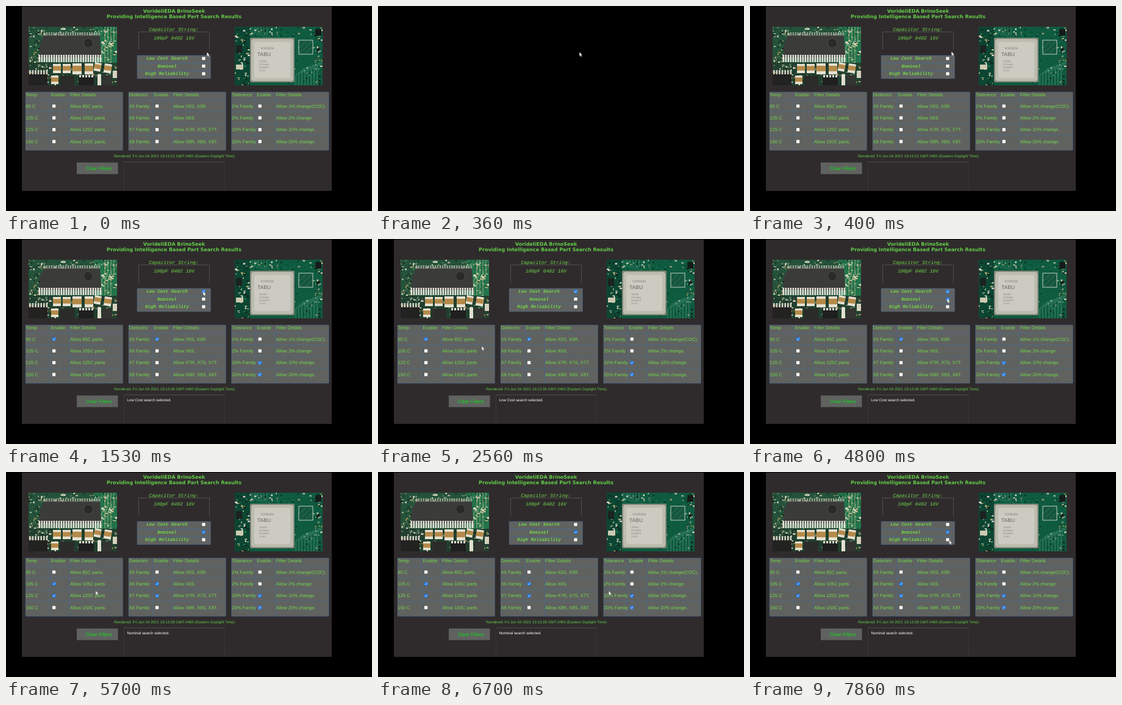
Recreate the animation shown at these times as an HTML page. Size 600x336 px, loop 8 s.

```html
<!DOCTYPE html>
<html lang="en">
<head>
<meta charset="utf-8">
<title>Part search</title>
<style>
  html, body { margin: 0; width: 100%; height: 100%; overflow: hidden; background: #000; }
  svg { display: block; }
  #stage { width: 600px; height: 336px; }
  text { font: 7.6px "Liberation Sans", Arial, sans-serif; fill: #72d94c; white-space: pre; text-rendering: geometricPrecision; }
  .title { font: bold 8px "DejaVu Sans", Verdana, sans-serif; fill: #62cc48; text-anchor: middle; }
  .mono { font: italic bold 7.5px "Liberation Mono", "Courier New", monospace; text-anchor: middle; }
  .label { font-size: 8px; font-weight: normal; }
  .button { font-size: 8px; fill: #10dc18; }
  .stamp { font-size: 6.22px; fill: #62cc48; }
  .message { font-size: 6.2px; fill: #fff; }
  .maker { font-size: 5px; fill: #77786f; }
  .model { font-size: 8.6px; fill: #66675f; }
  .small { font-size: 3.6px; fill: #77786f; }

  .idle, .lowPick, .lowSet, .nomPick, .nomSet, .anySet, #blank { animation: 8s step-end infinite; }
  .idle { animation-name: idle; }
  .lowPick { animation-name: lowPick; }
  .lowSet { animation-name: lowSet; }
  .nomPick { animation-name: nomPick; }
  .nomSet { animation-name: nomSet; }
  .anySet { animation-name: anySet; }
  #blank { animation-name: blank; }
  @keyframes idle { 0% { opacity: 1 } 19.125%, 100% { opacity: 0 } }
  @keyframes lowPick { 0% { opacity: 0 } 18.25% { opacity: 1 } 61.625%, 100% { opacity: 0 } }
  @keyframes lowSet { 0% { opacity: 0 } 19.125% { opacity: 1 } 61.625%, 100% { opacity: 0 } }
  @keyframes nomPick { 0% { opacity: 0 } 60%, 100% { opacity: 1 } }
  @keyframes nomSet { 0% { opacity: 0 } 61.625%, 100% { opacity: 1 } }
  @keyframes anySet { 0% { opacity: 0 } 19.125%, 100% { opacity: 1 } }
  @keyframes blank { 0% { opacity: 0 } 4.5% { opacity: 1 } 5%, 100% { opacity: 0 } }

  #pointer { animation: travel 8s linear infinite; }
  @keyframes travel {
    0%, .75% { transform: translate(329px, 75.5px) }
    4.5% { transform: translate(330px, 75.5px) }
    5% { transform: translate(330px, 74.5px) }
    7.5% { transform: translate(327px, 79px) }
    10.75%, 11.25% { transform: translate(322px, 84px) }
    12%, 14.1% { transform: translate(322.4px, 85px) }
    16.25%, 26.25% { transform: translate(323px, 86px) }
    28.75% { transform: translate(270px, 126px) }
    30.6% { transform: translate(210px, 165px) }
    32% { transform: translate(170px, 175.5px) }
    33.5% { transform: translate(135px, 173px) }
    34.5%, 37% { transform: translate(123.5px, 169px) }
    38.75% { transform: translate(165px, 150px) }
    40.6% { transform: translate(275px, 120px) }
    42.5% { transform: translate(337.5px, 104.5px) }
    43.5% { transform: translate(340px, 103px) }
    47%, 50.4% { transform: translate(322.5px, 97px) }
    51.25%, 67% { transform: translate(323px, 97.5px) }
    68.75% { transform: translate(250px, 150px) }
    71.25% { transform: translate(147px, 194.5px) }
    73.1% { transform: translate(110px, 194px) }
    77%, 77.5% { transform: translate(96.5px, 190px) }
    79.4% { transform: translate(130px, 206px) }
    80.6% { transform: translate(190px, 209px) }
    83.1% { transform: translate(350px, 205px) }
    84.4% { transform: translate(405px, 185px) }
    85% { transform: translate(411px, 170px) }
    86.25% { transform: translate(380px, 147px) }
    87.5% { transform: translate(337px, 134px) }
    90% { transform: translate(322px, 115px) }
    91.25% { transform: translate(321.5px, 108px) }
    94.1%, 98.2% { transform: translate(326px, 111px) }
    98.25%, 100% { transform: translate(326.3px, 111.5px) }
  }
</style>
</head>
<body>
<svg id="stage" viewBox="0 0 600 336">
  <g id="page"></g>
  <rect id="blank" width="600" height="336" fill="#000"/>
  <path id="pointer" d="M.2 0V6.8L1.7 5.6L2.8 7.9L4.1 7.3L3.1 5.1H5Z" fill="#fff" stroke="#111" stroke-width=".3"/>
</svg>
<script>
  const rect = (x, y, w, h, fill, extra = '') =>
    `<rect x="${x}" y="${y}" width="${w}" height="${h}" fill="${fill}" ${extra}/>`;
  const text = (x, y, words, cls = '') => `<text x="${x}" y="${y}" class="${cls}">${words}</text>`;
  const stroke = (d, color, width = .7) =>
    `<path d="${d}" fill="none" stroke="${color}" stroke-width="${width}"/>`;
  const shape = (d, fill) => `<path d="${d}" fill="${fill}"/>`;
  const repeat = (count, draw) => Array.from({ length: count }, (_, i) => draw(i)).join('');
  const photo = (x, y, w, h, body) =>
    `<svg x="${x}" y="${y}" width="${w}" height="${h}" viewBox="0 0 ${w} ${h}">${body}</svg>`;

  // Seeded noise for scattered board parts
  let seed = 11;
  const random = (min, max) => {
    seed = (seed * 16807) % 2147483647;
    return min + (max - min) * seed / 2147483647;
  };
  const scatter = (count, x, y, w, h, colors) => repeat(count, i =>
    rect(random(x, x + w), random(y, y + h), random(1, 4), random(1, 3), colors[i % colors.length]));

  const capacitor = (x, y, w, h, turn = 0) =>
    `<g transform="translate(${x} ${y}) rotate(${turn})">` +
    rect(0, 0, w, h, '#e6e2d2') + rect(0, h * .22, w, h * .5, '#b58a4a') + '</g>';

  const checkbox = (cx, cy, cls) =>
    rect(cx - 2.6, cy - 2.6, 5.2, 5.2, '#fff', 'rx=".6"') +
    (cls ? `<g class="${cls}">` + rect(cx - 2.8, cy - 2.8, 5.6, 5.6, '#1672e6', 'rx=".8"') +
      stroke(`M${cx - 1.7} ${cy}l1.2 1.3l2.2 -2.7`, '#fff', .9) + '</g>' : '');

  const PANEL = '#606260', GRID = '#3c6ca6';
  const edge = `stroke="${GRID}" stroke-width=".4"`;

  function filterTable(x, heading, rows) {
    const ys = [154.5, 173.5, 193, 212];
    return rect(x, 141, 159.5, 95.5, PANEL, edge) +
      stroke(`M${x + 40} 141V236.5M${x + 72.3} 141V236.5` + ys.map(y => `M${x} ${y}h159.5`).join(''), GRID, .5) +
      text(x + .5, 148.3, heading) + text(x + 41.5, 148.3, 'Enable') + text(x + 73, 148.3, 'Filter Details') +
      rows.map(([name, details, cls], i) => {
        const y = 164 + i * 19.35;
        return text(x + .5, y + 2.5, name) + checkbox(x + 46.6, y, cls) + text(x + 73, y + 2.5, details);
      }).join('');
  }

  const boardWithPins = photo(37, 34, 145, 96,
    rect(0, 0, 145, 96, '#24523a') + rect(108, 0, 37, 62, '#23744c') +
    scatter(70, 0, 0, 145, 14, ['#b9b499', '#1c3a2a', '#6f8f68', '#e0dcc8']) +
    scatter(60, 0, 8, 22, 50, ['#e0d9bd', '#16211b', '#a08c58', '#3b6b4b']) +
    scatter(55, 118, 6, 24, 54, ['#d3c69c', '#12402a', '#8fa777', '#e6e0cc']) +
    repeat(4, i => stroke(`M${125 + i * 5} 0V22l-5 12V58`, '#a9b487', .9)) +
    repeat(24, i => rect(25 + i * 3.9, 9, 2, 7, '#a5a597')) +
    shape('M26 14H117L119 48H17L19 26Z', '#3b3b3a') +
    stroke('M26 14.5H117', '#5a5a57', 1) +
    '<circle cx="98" cy="27" r="7.5" fill="#2a2a29" stroke="#50504d" stroke-width=".8"/>' +
    rect(16, 47, 104, 3, '#1d1e1c') +
    repeat(26, i => rect(16.5 + i * 4, 46, 2.7, 12, '#e4e2d8')) +
    rect(0, 59, 145, 37, '#21402f') +
    scatter(120, 0, 58, 143, 36, ['#131c17', '#d9d4c0', '#4f7d5b', '#b98e4b', '#a8a58f']) +
    rect(0, 76, 31, 20, '#222221') + repeat(7, i => rect(1 + i * 4.6, 71, 2.6, 7, '#d5d2c4')) +
    capacitor(40, 61, 13, 15) + capacitor(56, 61, 13, 15) + capacitor(72, 60, 15, 18) +
    capacitor(92, 60, 14, 18) + capacitor(109, 58, 11, 14, 10) + capacitor(125, 60, 12, 15, 8) +
    capacitor(37, 80, 12, 14) +
    rect(52, 80, 23, 16, '#2b2b29') + rect(82, 81, 25, 15, '#1e1f1e') +
    repeat(5, i => rect(83 + i * 5, 79, 3, 4, '#dedbd0')) +
    rect(113, 78, 6, 18, '#e3dfd0') + rect(121, 80, 15, 16, '#343431') + rect(138, 72, 7, 12, '#d6d1bf'));

  const boardWithPackage = photo(375, 34, 144, 96,
    rect(0, 0, 144, 96, '#0f5b40') + rect(0, 0, 25, 96, '#0c4632') +
    scatter(130, 0, 0, 142, 94, ['#0a3526', '#1f7a58', '#a9b79f', '#0d4a35']) +
    scatter(45, 0, 0, 22, 94, ['#e2dfcf', '#141d19', '#b7a979']) +
    scatter(22, 22, 0, 84, 14, ['#d9d5c0', '#0a2f22', '#a8a27c']) +
    scatter(35, 130, 0, 12, 94, ['#dcd5bb', '#141d19', '#a9945c']) +
    repeat(8, i => stroke(`M${100 + i * 5} 96V${80 - i * 2}l14 -12`, '#5ba083', .7)) +
    repeat(6, i => stroke(`M${28 + i * 5} 0V${8 + i}l5 5`, '#5ba083', .6)) +
    rect(105, 22, 23, 23, '#15563e', 'stroke="#d4ddd2" stroke-width=".9"') +
    stroke('M107 43L126 24M107 34L117 24M117 43L126 34', '#3d7f63', .8) +
    rect(132, 4, 10, 11, '#161c19') + rect(2, 30, 10, 13, '#1b2420') + rect(2, 62, 12, 8, '#cfc9b2') +
    rect(25, 18, 73, 73, '#87897a', 'rx="2"') +
    rect(27, 20, 69, 69, '#bcbdb0', 'rx="4"') +
    rect(32, 25, 59, 59, '#cbcbc1', 'rx="3"') +
    text(42, 37, 'VORDEM', 'maker') + text(37, 47.5, 'TABU', 'model') +
    text(40, 58, 'TB7020', 'small') + text(40, 63, 'CKG484A', 'small') +
    text(40, 68, 'D2148573', 'small') + text(40, 73, '1C-ES', 'small'));

  const stamp = (seconds, cls) =>
    text(177, 248, `Rendered: Fri Jun 04 2021 19:13:${seconds} GMT-0400 (Eastern Daylight Time)`, `stamp ${cls}`);

  document.getElementById('page').innerHTML =
    rect(26, 1, 508, 302, '#2f2b2c') +
    text(275.5, 11, 'VorideliEDA BrinoSeek', 'title') +
    text(275.5, 20.3, 'Providing Intelligence Based Part Search Results', 'title') +
    boardWithPins + boardWithPackage +
    text(275, 41, 'Capacitor String:', 'mono label') +
    stroke('M217.5 72V42.5H333.5V72', '#5f5c5c') +
    text(275.5, 54.5, '100pF 0402 16V', 'mono label') +
    rect(215, 81, 120.5, 38, PANEL, edge) + stroke('M215 93.6H335.5M215 106.2H335.5', GRID, .6) +
    [['Low Cost Search', 'lowPick'], ['Nominal', 'nomPick'], ['High Reliability', '']].map(([name, cls], i) =>
      text(264, 88.2 + i * 12.5, name, 'mono') + checkbox(324, 86 + i * 12.5, cls)).join('') +
    filterTable(32, 'Temp', [
      ['85 C', 'Allow 85C parts.', 'lowSet'],
      ['105 C', 'Allow 105C parts', 'nomSet'],
      ['125 C', 'Allow 125C parts', 'nomSet'],
      ['150 C', 'Allow 150C parts.', '']]) +
    filterTable(201, 'Dielectric', [
      ['X5 Family', 'Allow X5S, X5R.', 'lowSet'],
      ['X6 Family', 'Allow X6S.', 'nomSet'],
      ['X7 Family', 'Allow X7R, X7S, X7T.', 'nomSet'],
      ['X8 Family', 'Allow X8R, X8S, X8T.', '']]) +
    filterTable(369.7, 'Tolerance', [
      ['1% Family', 'Allow 1% change(COC).', ''],
      ['2% Family', 'Allow 2% change.', ''],
      ['10% Family', 'Allow 10% change.', 'anySet'],
      ['20% Family', 'Allow 20% change.', 'anySet']]) +
    stamp(21, 'idle') + stamp(36, 'lowSet') + stamp(39, 'nomSet') +
    rect(116, 256.5, 67.5, 19, PANEL) + text(130.6, 269, 'Clear Filters', 'button') +
    stroke('M193.5 303V255.5M358 255.5V303', '#403c3d') + stroke('M193.5 255.5H358', '#5b5859') +
    text(198.5, 266, 'Low Cost search selected.', 'message lowSet') +
    text(198.5, 266, 'Nominal search selected.', 'message nomSet');
</script>
</body>
</html>
```
